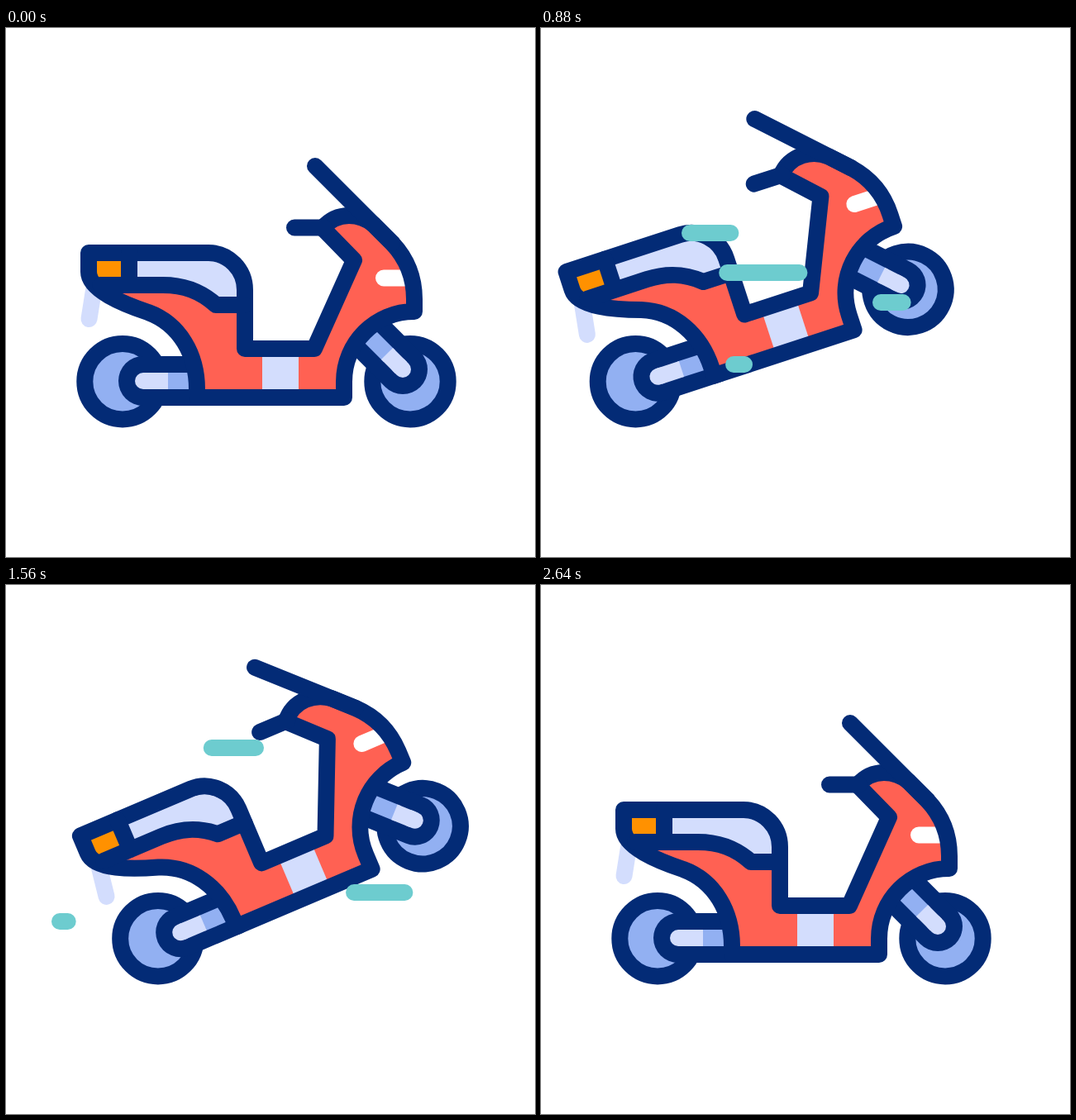
An HTML page that plays this animation: 640x640 px, repeating every 2800 ms.

```html
<!DOCTYPE html>
<html lang="en">
<head>
<meta charset="utf-8">
<title>Scooter wheelie</title>
<style>
  html, body { margin: 0; width: 100%; height: 100%; overflow: hidden; background: #fff; }
  svg { display: block; width: 100vw; height: 100vh; }
  .line { fill: none; stroke: #032b76; stroke-width: 20; stroke-linecap: round; stroke-linejoin: round; }
  .thick { stroke-width: 60; }
  .pale { stroke: #d3ddfd; }
  .butt { stroke-linecap: butt; }
  .mid { stroke: #92b0f2; }
  .white { stroke: #fff; }
  .tyre { fill: #92b0f2; stroke: #032b76; stroke-width: 20; }
  .dash { stroke: #6dcccf; }
</style>
</head>
<body>
<svg viewBox="0 0 640 640">
  <defs>
    <path id="shell" d="M100 272H245C269 272 289 292 289 317V388H373L421 281L383 242Q396 227 415 227Q432 227 445 238L467 260C485 279 494 303 494 328V343C447 343 409 381 409 428V447H231V437C231 395 210 358 172 344C142 334 100 317 100 295Z"/>
  </defs>
  <circle id="rear" class="tyre" cx="141" cy="427.7" r="45.7"/>
  <circle id="front" class="tyre" cx="489" cy="427.7" r="45.7"/>
  <g id="body">
    <path class="line pale" d="M107 311L100.5 352"/>
    <path class="line thick" d="M166 427H235"/>
    <path class="line mid butt" d="M194 427H226"/>
    <path class="line pale" d="M166 427H170"/>
    <path class="line pale butt" d="M168 427H196"/>
    <path class="line thick" d="M480 413L440 373"/>
    <path class="line mid butt" d="M464 397L432 365"/>
    <path class="line pale" d="M480 413L475 408"/>
    <path class="line pale butt" d="M478 411L461 394"/>
    <use href="#shell" fill="#ff6153"/>
    <path fill="#d3ddfd" d="M149 272H245C269 272 289 292 289 317V335H254C235 318 215 311 190 311H149Z"/>
    <path fill="#ff9100" d="M100 272H149V311H107L100 295Z"/>
    <path fill="#d3ddfd" d="M310 392H354V442H310Z"/>
    <path class="line white" d="M457 302.5H486"/>
    <use href="#shell" class="line"/>
    <path class="line" d="M149 272V311M114 311H190C215 311 235 318 254 335H289M349 241.5H385M374 167L467 260"/>
  </g>
  <g id="wind"></g>
</svg>
<script>
const LOOP = 2800, STEP = 20;
const PACE = 3.1, LONGEST = 560, LAG = 190;   // ms per px, ms, ms
const $ = id => document.getElementById(id);
const clamp = u => Math.min(1, Math.max(0, u));

// Sine ease from 0 to 1 between two times.
const ramp = (t, a, b) => (1 - Math.cos(Math.PI * clamp((t - a) / (b - a)))) / 2;

function pose(t) {
  const dip = ramp(t, 220, 620) - ramp(t, 2150, 2640);
  const lift = ramp(t, 630, 980) - ramp(t, 1720, 2150);
  const x = -30 * ramp(t, 220, 750) + 78 * ramp(t, 750, 1720)
          - 50 * ramp(t, 1720, 2120) + 2 * ramp(t, 2120, 2640);
  return { x, front: -23 * lift, body: 3 * dip - 26 * lift };
}

// A line of wind: the head runs first, the tail follows after LAG.
function dash(y, from, to, start) {
  const el = document.createElementNS('http://www.w3.org/2000/svg', 'path');
  el.setAttribute('class', 'line dash');
  $('wind').append(el);
  const span = Math.min(LONGEST, PACE * (from - to));
  const x = age => from + (to - from) * clamp(age / span);
  return t => {
    const age = t - start;
    const shown = age > 0 && age < span + LAG;
    el.setAttribute('d', shown ? `M${x(age)} ${y}H${x(age - LAG) + 0.01}` : '');
  };
}

const wind = [
  dash(332, 557, 411, 320),
  dash(248, 291, 180, 499),
  dash(296, 317, 60, 680),
  dash(407, 246, 65, 840),
  dash(372, 503, 387, 1306),
  dash(197, 302, 130, 1395),
  dash(272, 492, 406, 1838),
  dash(372, 284, 102, 1856),
  dash(320, 343, 230, 2054)
];

const place = (id, x, turn, px, py) =>
  $(id).setAttribute('transform', `translate(${x} 0) rotate(${turn} ${px} ${py})`);

function draw(t) {
  const { x, front, body } = pose(t);
  place('rear', x, 0, 141, 428);
  place('front', x, front, 141, 428);
  place('body', x, body, 150.7, 418);
  wind.forEach(blow => blow(t));
}

const begin = performance.now();
function tick() {
  const t = (performance.now() - begin) % LOOP;
  draw(Math.floor(t / STEP) * STEP);
  requestAnimationFrame(tick);
}
tick();
</script>
</body>
</html>
```
